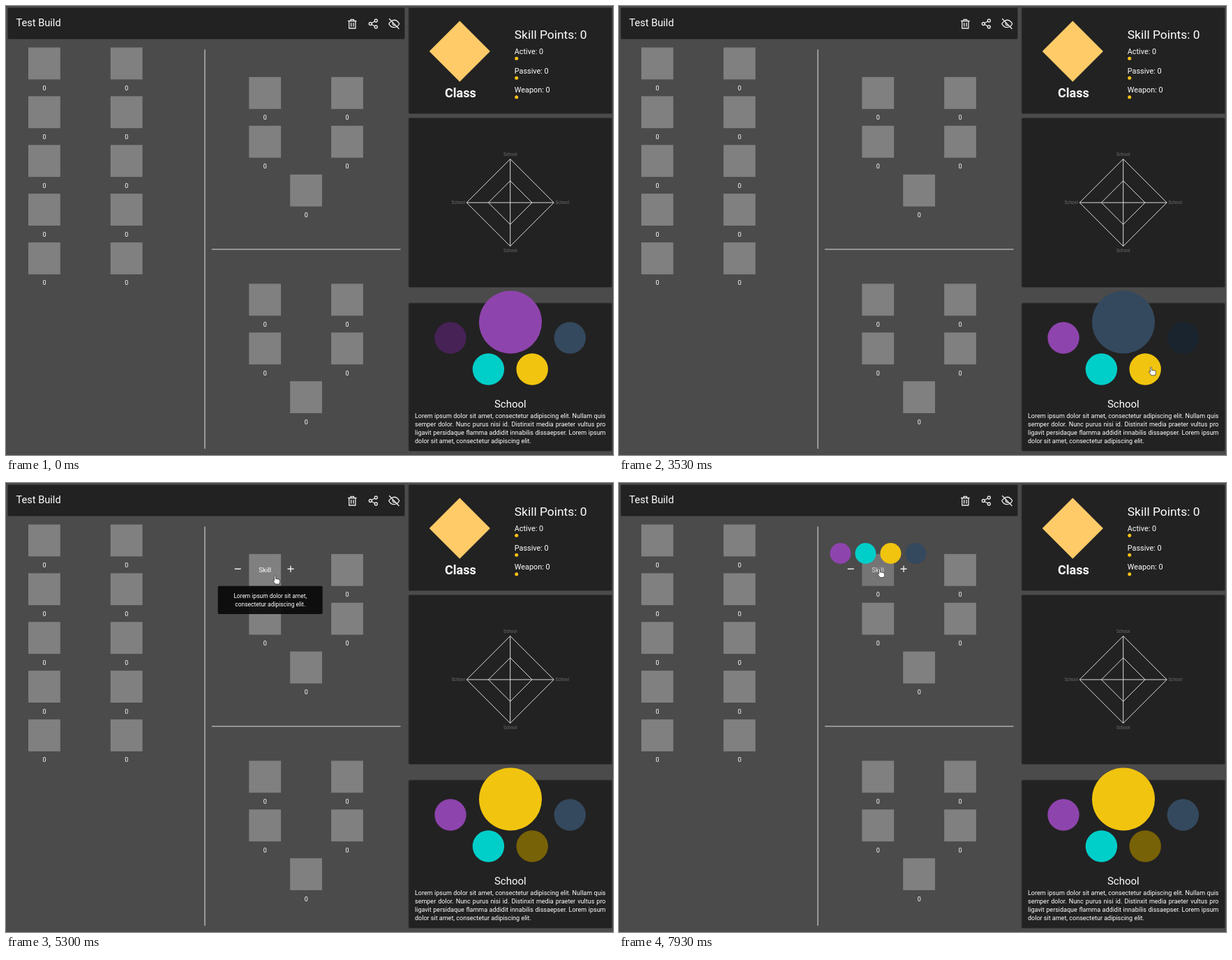
Write an HTML page that moves like this. It is 870x644 px and loops after 8000 ms.

```html
<!DOCTYPE html>
<html lang="en">
<head>
<meta charset="utf-8">
<title>Skill build planner</title>
<style>
html, body { margin: 0; width: 100%; height: 100%; overflow: hidden; background: #4b4b4b; }
svg { display: block; font-family: Roboto, sans-serif; fill: #fff; }
.panel { fill: #222; stroke: #383838; stroke-width: 1; }
.line { fill: none; stroke: #ddd; stroke-width: 1; }
.icon { fill: none; stroke: #eee; stroke-width: 1.3; stroke-linecap: round; stroke-linejoin: round; }
.mid { text-anchor: middle; }
.count { font-size: 9px; text-anchor: middle; }
.tiny { font-size: 6.4px; fill: #6c6c6c; text-anchor: middle; }
.tip { font-size: 8.45px; text-anchor: middle; }
p { margin: 0; font: 9px/12px Roboto, sans-serif; color: #fff; text-align: justify; }
</style>
</head>
<body>
<svg width="870" height="644" viewBox="0 0 870 644">
  <g class="panel">
    <rect x="2.5" y="2.5" width="569" height="45" rx="2"/>
    <rect x="577" y="2.5" width="291.5" height="152" rx="2"/>
    <rect x="577" y="160.5" width="291.5" height="243" rx="2"/>
    <rect x="577" y="426" width="291.5" height="212.5" rx="2"/>
  </g>
  <text x="14.5" y="29" font-size="14.6">Test Build</text>

  <g class="icon">
    <path d="M490.5 21.5h11.500M494 21.500v-2.200h4.500v2.200M491.700 21.500v10.500h9.200v-10.500M494.700 24.500v4.700M498 24.500v4.700"/>
    <circle cx="530.3" cy="21" r="2"/><circle cx="522.3" cy="25.5" r="2"/><circle cx="530.3" cy="30" r="2"/>
    <path d="M524.100 24.500l4.400-2.500M524.100 26.500l4.400 2.500"/>
    <path d="M549.500 18.500l13.500 14M553.500 20.800q6.500-2.300 10.200 4.700-1.200 2.300-2.700 3.500M551.500 22.500q-1.800 1.400-2.800 3 3.800 7 10.500 4.500M554.500 23.700a2.600 2.600 0 0 0 3.500 3.700"/>
  </g>

  <path d="M285 62.500V635M295 349H565.500" stroke="#adadad" stroke-width="1.6"/>
  <g id="slots"></g>

  <path d="M650.300 22.200L693 65 650.300 107.800 607.600 65Z" fill="#ffcb69" stroke="#ffcb69" stroke-width="1.2" stroke-linejoin="round"/>
  <text class="mid" x="651.3" y="130.5" font-size="18" font-weight="700">Class</text>
  <text x="728.8" y="47" font-size="17.4">Skill Points: 0</text>
  <g font-size="10.85">
    <text x="728.8" y="68.7">Active: 0</text>
    <text x="728.8" y="96.500">Passive: 0</text>
    <text x="728.8" y="124">Weapon: 0</text>
  </g>
  <g fill="#fbc117">
    <circle cx="731.7" cy="75.300" r="2.500"/><circle cx="731.7" cy="103.200" r="2.500"/><circle cx="731.7" cy="130.700" r="2.500"/>
  </g>

  <path class="line" d="M722.700 219.500l62.500 62.500-62.500 62.500-62.500-62.500zM722.700 250.700l31.300 31.300-31.300 31.300-31.300-31.300zM722.700 219.500v125M660.200 282h125"/>
  <g class="tiny">
    <text x="722.700" y="214.500">School</text><text x="722.700" y="352.500">School</text>
    <text x="648.200" y="284">School</text><text x="797.200" y="284">School</text>
  </g>

  <circle id="big" cx="723" cy="453.500" r="45"/>
  <g id="schools"></g>
  <clipPath id="clip"><circle id="clipDisc" r="22.700"/></clipPath>
  <g clip-path="url(#clip)"><circle id="ripple"/></g>
  <text class="mid" x="722.800" y="576" font-size="15">School</text>
  <foreignObject x="586" y="582" width="273.500" height="54">
    <p>Lorem ipsum dolor sit amet, consectetur adipiscing elit. Nullam quis semper dolor. Nunc purus nisi id. Distinxit media praeter vultus pro ligavit persidaque flamma addidit innabilis dissaepser. Lorem ipsum dolor sit amet, consectetur adipiscing elit.</p>
  </foreignObject>

  <g id="hover">
    <rect id="shade" x="-23" y="102" width="46" height="46" opacity=".09" fill="#000"/>
    <text id="skill" class="mid" y="127.800" font-size="9.700">Skill</text>
    <path d="M-43.500 123.300h9M32.300 123.300h9M36.800 118.800v9" stroke="#eee" stroke-width="1.400"/>
    <g id="tooltip" class="tip">
      <rect x="-67.500" y="147.700" width="150" height="40.300" rx="2" fill="#080808" opacity=".9"/>
      <text x="7.500" y="165">Lorem ipsum dolor sit amet,</text>
      <text x="7.500" y="177">consectetur adipiscing elit.</text>
    </g>
    <g id="menu"></g>
  </g>

  <g id="cursor" stroke-linejoin="round">
    <path id="arrow" d="M0 0v9.500l2.200-2 1.500 3.400 1.700-.800-1.500-3.300h3z" fill="#fff" stroke="#222" stroke-width=".7"/>
    <path id="hand" d="M-1 .500q1-1.300 2 0v4q4-.3 6 1.500 .500 3-1 6h-5.500q-1.500-2.200-3.500-5 .6-1.400 2 .2z" fill="#fff" stroke="#222" stroke-width=".7"/>
  </g>
</svg>
<script>
const $ = id => document.getElementById(id);
const LOOP = 8000, TICK = 76.7;
const colors = ['#8e44ad', '#00cec9', '#f1c40f', '#34495e'];
const dimmed = ['#472256', '#006764', '#786207', '#1a242f'];
const spots = [[637, 476], [691.4, 521], [754.2, 521], [808.3, 476]];

// Skill slots: a two-column block, optionally ending in one centred slot
const slots = [];
function block(x, y, rows, tail) {
  for (let r = 0; r < rows; r++) slots.push([x, y + r * 69.9], [x + 117.800, y + r * 69.9]);
  if (tail) slots.push([x + 58.9, y + rows * 69.9]);
}
block(32, 59.5, 5);
block(348.3, 101.9, 2, true);
block(348.3, 398.4, 2, true);
$('slots').innerHTML = slots.map(([x, y]) =>
  `<rect x="${x}" y="${y}" width="45.800" height="45.800" fill="#808080"/>
   <text class="count" x="${x + 23}" y="${y + 61.3}">0</text>`).join('');

const disc = (x, y, r, c) => `<circle cx="${x}" cy="${y}" r="${r}" fill="${c}"/>`;
$('schools').innerHTML = spots.map(([x, y], i) => disc(x, y, 22.7, colors[i])).join('');
$('menu').innerHTML = colors.map((c, i) => disc(-53.800 + i * 36, 101, 15, c)).join('');

// Pointer path: time, x, y
const path = [
  [283, 766, 601], [820, 705, 516], [1463, 705, 516], [1840, 760, 520],
  [2305, 760, 520], [2610, 807, 475], [3080, 807, 475], [3600, 756, 524],
  [3843, 756, 524], [4230, 661, 93], [4690, 609, 124], [4990, 499, 140],
  [5300, 385, 133], [5453, 385, 133], [5760, 379, 126.5], [5920, 379, 126.5],
  [6300, 377, 126], [7000, 376, 126], [7230, 373.500, 123.500], [8000, 373.500, 123.500]
];
function pointer(t) {
  const base = t < 990 ? 360 : 1080;
  const q = base + TICK * Math.floor((t + 5 - base) / TICK);
  const i = Math.max(1, path.findIndex(p => p[0] >= q));
  const [t0, x0, y0] = path[i - 1], [t1, x1, y1] = path[i];
  const k = Math.max(0, Math.min(1, (q - t0) / (t1 - t0)));
  return [x0 + (x1 - x0) * k, y0 + (y1 - y0) * k];
}

// Clicks: press, selection change, ripple end, school
const clicks = [[990, 1080, 1540, 1], [1847, 1923, 2000, 2], [2690, 2840, 3150, 3], [3611, 3688, 3762, 2]];

const show = (id, on) => $(id).style.display = on ? '' : 'none';

function draw(t) {
  let chosen = 0, rippling = false;
  for (const [press, change, end, school] of clicks) {
    if (t >= press && t < end) {
      const [x, y] = pointer(press), grown = t >= change, el = $('ripple');
      rippling = true;
      el.setAttribute('cx', x);
      el.setAttribute('cy', y);
      el.setAttribute('r', grown ? 22 : 7.5);
      el.setAttribute('fill', grown ? '#000' : colors[chosen]);
      el.setAttribute('opacity', grown ? .15 : .55);
      $('clipDisc').setAttribute('cx', spots[school][0]);
      $('clipDisc').setAttribute('cy', spots[school][1]);
    }
    if (t >= change) chosen = school;
  }
  show('ripple', rippling);
  $('big').setAttribute('fill', colors[chosen]);
  [...$('schools').children].forEach((c, i) => c.setAttribute('fill', (i === chosen ? dimmed : colors)[i]));

  const second = t >= 4910 && t < 5065, first = t >= 5215, open = t >= 7535;
  show('hover', first || second);
  $('hover').setAttribute('transform', `translate(${second ? 489 : 371.2} 0)`);
  show('tooltip', t < 7455);
  show('menu', open);
  show('shade', open);
  $('menu').setAttribute('opacity', t < 7615 ? .6 : 1);
  $('skill').setAttribute('opacity', open ? .75 : 1);

  const [x, y] = pointer(t);
  const hand = first || second || spots.some(([a, b]) => Math.hypot(x - a, y - b) < 22.7);
  show('cursor', t >= 360);
  show('hand', hand);
  show('arrow', !hand);
  $('cursor').setAttribute('transform', `translate(${x} ${y})`);
}

const start = performance.now();
function frame() {
  draw((performance.now() - start) % LOOP);
  requestAnimationFrame(frame);
}
frame();
</script>
</body>
</html>
```
